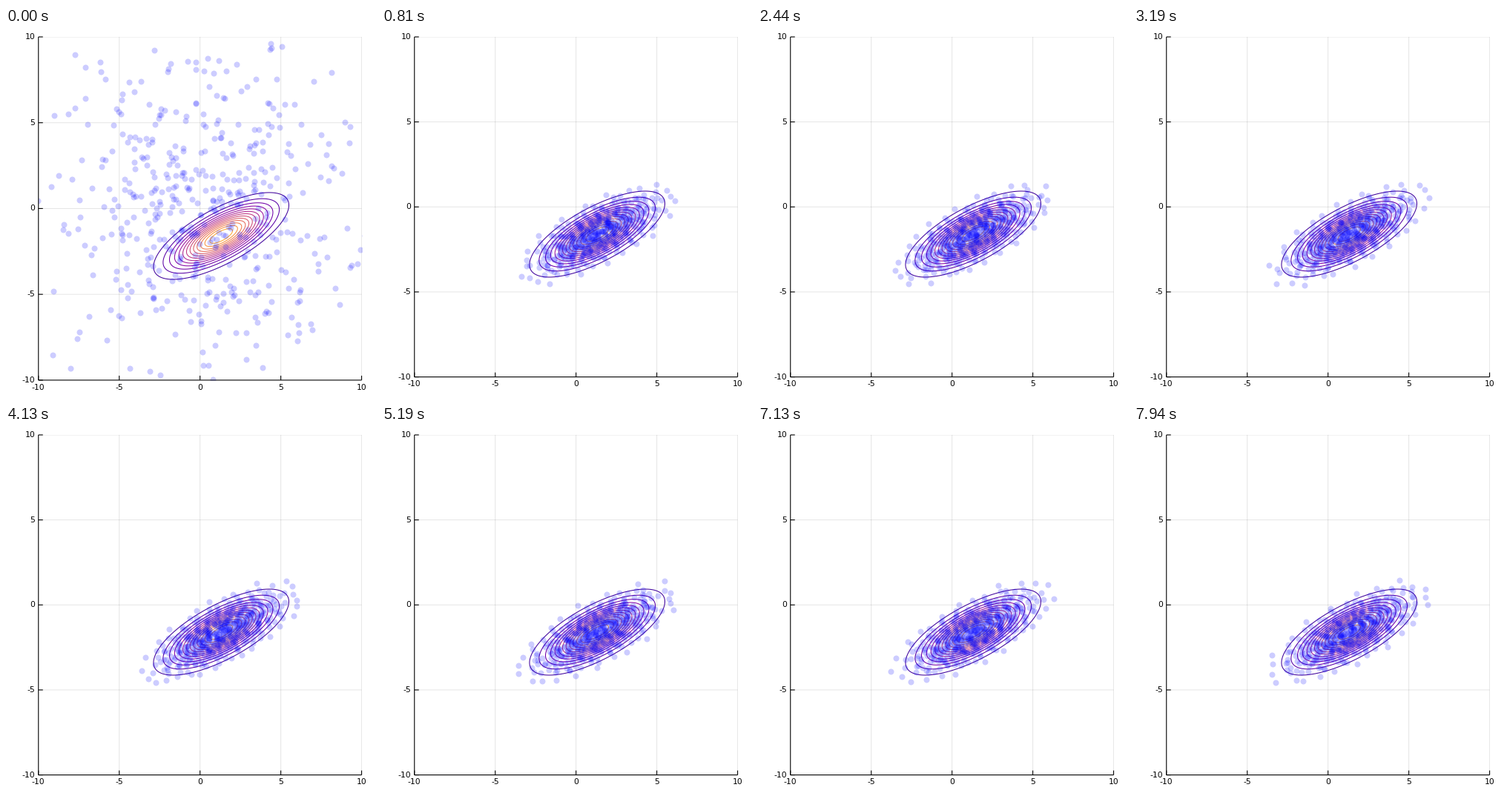
Animation of 499x499 px, one loop 8000 ms. Source, as a matplotlib script:

```python
import numpy as np
import matplotlib.pyplot as plt
from matplotlib.animation import FuncAnimation
from matplotlib.collections import LineCollection
from matplotlib.patches import Rectangle

SIZE, DPI = 499, 100
FRAMES, LOOP_MS = 128, 8000
LEFT, RIGHT, TOP = 43.75, 479.6, 12.0
COUNT = 500

# Target density: a correlated 2D normal
MEAN = np.array([1.31, -1.6])
SX, SY, RHO = 1.823, 1.101, 0.71
CHOL = np.array([[SX, 0], [RHO * SY, SY * np.sqrt(1 - RHO ** 2)]])
LEVELS = 14

# Particle flow
WIDTH = 0.32
SUBSTEPS, DT = 6, 0.067
WANDER, MEMORY = 0.24, 0.9


def pt(px):
    return px * 72 / DPI


def bottom(frame):
    return 474.9 if frame == 0 else 470.6


def to_px(points, low):
    x = LEFT + (points[..., 0] + 10) / 20 * (RIGHT - LEFT)
    y = low - (points[..., 1] + 10) / 20 * (low - TOP)
    return np.stack([x, y], axis=-1)


def drift(z):
    """Pull towards the target plus repulsion from the particles' own density."""
    sq = (z * z).sum(axis=1)
    dist = np.maximum(sq[:, None] + sq[None, :] - 2 * z @ z.T, 0)
    k = np.exp(dist * np.float32(-0.5 / WIDTH ** 2))
    mass = k.sum(axis=1, keepdims=True)
    return -z + (z - k @ z / mass) / np.float32(WIDTH ** 2)


def simulate():
    rng = np.random.default_rng(5)
    start = rng.normal(0, 4.6, (COUNT, 2))
    z = np.linalg.solve(CHOL, (start - MEAN).T).T.astype(np.float32)
    push = rng.normal(0, WANDER, z.shape).astype(np.float32)
    path = [start]
    for _ in range(FRAMES - 1):
        for _ in range(SUBSTEPS):
            z = z + np.float32(DT) * (drift(z) + push)
        kick = rng.normal(0, WANDER * np.sqrt(1 - MEMORY ** 2), z.shape)
        push = (MEMORY * push + kick).astype(np.float32)
        path.append(MEAN + z @ CHOL.T)
    return path


path = simulate()

angle = np.linspace(0, 2 * np.pi, 181)
circle = np.column_stack([np.cos(angle), np.sin(angle)]) @ CHOL.T
shares = np.arange(1, LEVELS) / LEVELS
rings = [MEAN + np.sqrt(-2 * np.log(s)) * circle for s in shares]

fig = plt.figure(figsize=(SIZE / DPI, SIZE / DPI), dpi=DPI, facecolor="white")
ax = fig.add_axes([0, 0, 1, 1])
ax.set_xlim(0, SIZE)
ax.set_ylim(SIZE, 0)
ax.axis("off")

VALUES = (-10, -5, 0, 5, 10)
grid = LineCollection([], colors="black", alpha=0.1, linewidths=pt(1), zorder=1)
contours = LineCollection([], colors=plt.cm.plasma(0.04 + 0.82 * shares),
                          linewidths=pt(1.05), zorder=2)
frame_lines = LineCollection([], colors="black", linewidths=pt(1.1), zorder=4)
for lines in (grid, contours, frame_lines):
    lines.set_snap(False)
    ax.add_collection(lines)

dots = ax.scatter([], [], s=pt(8) ** 2, c="blue", alpha=0.2, linewidths=0, zorder=3)
window = Rectangle((LEFT, TOP), RIGHT - LEFT, 1, fill=False, lw=0)
ax.add_patch(window)

font = dict(family="DejaVu Sans", size=pt(10.7), color="black", va="center")
x_labels = [ax.text(0, 0, str(v), ha="center", **font) for v in VALUES]
y_labels = [ax.text(0, 0, str(v), ha="right", **font) for v in VALUES]


def layout(low):
    xs = [to_px(np.array([v, -10]), low)[0] for v in VALUES]
    ys = [to_px(np.array([-10, v]), low)[1] for v in VALUES]
    grid.set_segments([[(x, TOP), (x, low)] for x in xs[1:]]
                      + [[(LEFT, y), (RIGHT, y)] for y in ys[1:]])
    ticks = [[(x, low), (x, low - 6)] for x in xs]
    ticks += [[(LEFT, y), (LEFT + 6, y)] for y in ys]
    frame_lines.set_segments([[(LEFT, TOP), (LEFT, low)],
                              [(LEFT, low), (RIGHT, low)]] + ticks)
    contours.set_segments([to_px(r, low) for r in rings])
    window.set_height(low - TOP)
    for clipped in (dots, grid):
        clipped.set_clip_path(window)
    for label, x in zip(x_labels, xs):
        label.set_position((x, low + 9.8))
    for label, y in zip(y_labels, ys):
        label.set_position((39.2, y))


def update(frame):
    low = bottom(frame)
    layout(low)
    dots.set_offsets(to_px(path[frame], low))
    return [dots, grid, contours, frame_lines, *x_labels, *y_labels]


anim = FuncAnimation(fig, update, frames=FRAMES, interval=LOOP_MS / FRAMES,
                     repeat=True, repeat_delay=0, blit=False)
plt.show()
```
